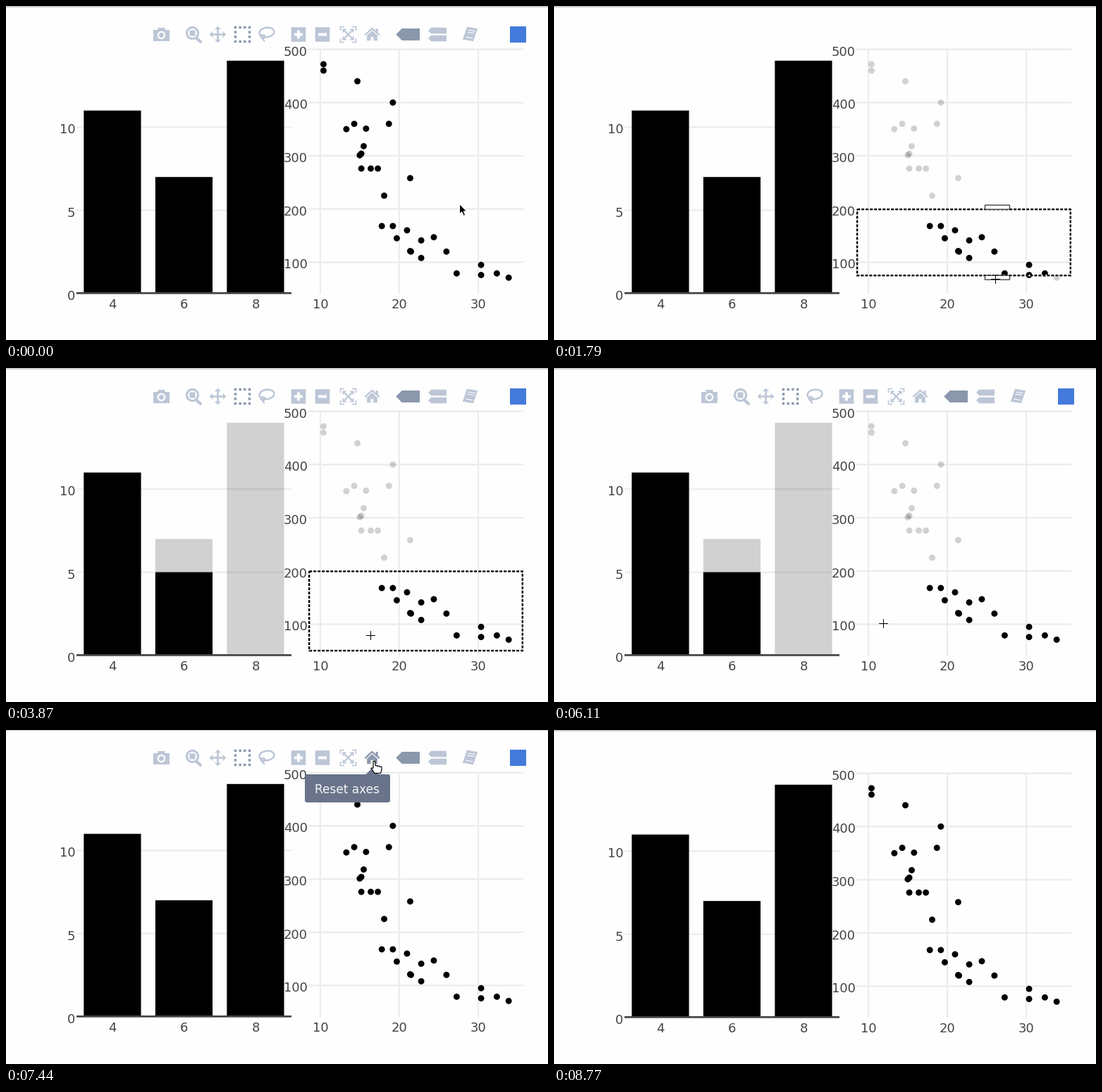
A matplotlib script for the animation above (9670 ms loop, 769 by 475 pixels).

```python
from itertools import product

import numpy as np
import matplotlib.pyplot as plt
from matplotlib.animation import FuncAnimation
from matplotlib.colors import to_rgb
from matplotlib.patches import Ellipse, FancyBboxPatch, Polygon, Rectangle

W, H, DPI = 769, 475, 64
PT = 72 / DPI                      # points per pixel
LOOP, STEPS, SUB = 9670, 65, 3
BG, INK, GRID = "#fefefe", "#444444", "#ececec"
ICON, ACTIVE, BLUE, TIP = "#bcc6d6", "#8b97ab", "#447adb", "#69738a"
FADE = 0.175

fig = plt.figure(figsize=(W / DPI, H / DPI), dpi=DPI, facecolor=BG)
ax = fig.add_axes([0, 0, 1, 1])
ax.axis("off")


def add(patch):
    patch.set_snap(False)
    return ax.add_patch(patch)


def rect(x0, y0, x1, y1, color, z=1, **kw):
    kw.setdefault("lw", 0)
    return add(Rectangle((x0, y0), x1 - x0, y1 - y0, fc=color, zorder=z, **kw))


def poly(pts, color, z=1, **kw):
    kw.setdefault("lw", 0)
    return add(Polygon(pts, closed=True, fc=color, zorder=z, **kw))


def line(pts, color, width, z=1, cap="butt"):
    xs, ys = zip(*pts)
    return ax.plot(xs, ys, color=color, lw=width * PT, zorder=z, snap=False,
                   solid_capstyle=cap, solid_joinstyle="miter")[0]


def label(x, y, s, size=18, color=INK, font="DejaVu Sans", z=3, ha="right"):
    return ax.text(x, y, s, fontsize=size * PT, color=color, family=font,
                   ha=ha, va="baseline", zorder=z)


# Page edge
rect(0, 0, W, 1, "#d0d0d0")
rect(0, 1, W, 2, "#c6c6c6")


# Bar chart
def bar_y(v):
    return 408.6 - 23.63 * v


for v in (0, 5, 10):
    y = bar_y(v)
    if v:
        rect(100, y - 1.1, 405, y + 1.1, GRID)
    label(98.3, y + 9.1, str(v))
rect(100, 407, 405, 409.7, INK, 3)

COUNTS, PICKED = (11, 7, 14), (11, 5, 0)
base_bars, top_bars = [], []
for i, n in enumerate(COUNTS):
    mid = 100.2 + 101.5 * (i + 0.5)
    label(mid, 430, str(4 + 2 * i), ha="center")
    for group, color in ((base_bars, (0, 0, 0, FADE)), (top_bars, "black")):
        group.append(rect(mid - 40.6, bar_y(n), mid + 40.6, bar_y(0), color, 2))


# Scatter plot
def dot_x(v):
    return 446 + 11.18 * (v - 10)


def dot_y(v):
    return 364.4 - 0.757 * (v - 100)


for v in (10, 20, 30):
    x = round(dot_x(v))
    rect(x - 1.1, 61, x + 1.1, 409, GRID)
    label(x, 430, str(v), ha="center")
for v in range(100, 501, 100):
    y = dot_y(v)
    rect(429, y - 1.2, 734, y + 1.2, GRID)
    label(428, y + 9, str(v))

# The charted data: fuel economy, engine size
CARS = np.array([
    (21, 160), (22.8, 108), (21.4, 258), (18.7, 360), (18.1, 225), (14.3, 360),
    (24.4, 147), (22.8, 141), (19.2, 168), (17.8, 168), (16.4, 276), (17.3, 276),
    (15.2, 276), (10.4, 472), (10.4, 460), (14.7, 440), (32.4, 79), (30.4, 76),
    (33.9, 71), (21.5, 120), (15.5, 318), (15.2, 304), (13.3, 350), (19.2, 400),
    (27.3, 79), (26, 120), (30.4, 95), (15.8, 351), (19.7, 145), (15, 301),
    (21.4, 121)])
px, py = dot_x(CARS[:, 0]), dot_y(CARS[:, 1])
dots = ax.scatter(px, py, s=(8.9 * PT) ** 2, c="black", linewidths=0, zorder=4)

# Selection outline and its drag handles
LEFT, RIGHT, TOP = 430.2, 732.8, 289.2
dash = (0, (4 / 2.4, 2 / 2.4))
outline = [rect(LEFT, TOP, RIGHT, TOP, "none", 5, ec=c, lw=2.4 * PT, ls=s)
           for c, s in (("white", "-"), ("black", dash))]
grips = [rect(611.5, y, 646.5, y + 6, "white", 6, ec=INK, lw=1.4 * PT)
         for y in (TOP - 6, TOP)]

# Hover label
hover = [
    rect(457, 363, 538, 397, BG, 6),
    rect(538, 366, 626, 394, "black", 7),
    poly([(625.5, 372), (634, 380), (625.5, 388)], "black", 7),
    label(532, 387, "selected", 19, "black", "Liberation Sans", 8),
    label(582, 387, "(27.3, 79)", 19, "white", "Liberation Sans", 8, "center"),
]

# Button tooltip
tooltip = [
    add(FancyBboxPatch((427, 67), 115, 34, fc=TIP, lw=0, zorder=8,
                       boxstyle="round,pad=3,rounding_size=3")),
    poly([(510, 64.5), (519.5, 55.5), (529, 64.5)], TIP, 8),
    label(484.5, 91, "Reset axes", 17, "#f4f4f6", z=9, ha="center"),
]

# Toolbar: every part keeps its full colour so it can be faded to the page
MID = 40.5
parts = []


def part(artist, color):
    parts.append((artist, np.array(to_rgb(color))))
    return artist


def fill(pts, color=ICON):
    return part(poly(pts, color), color)


def box(x, y, w, h, color=ICON):
    return part(rect(x - w / 2, y - h / 2, x + w / 2, y + h / 2, color), color)


def stroke(pts, width, color=ICON, cap="butt"):
    return part(line(pts, color, width, cap=cap), color)


def disc(x, y, r, color=ICON):
    part(add(Ellipse((x, y), 2 * r, 2 * r, fc=color, lw=0)), color)


def ring(x, y, w, h, width, angle=0):
    part(add(Ellipse((x, y), w, h, angle=angle, fill=False, ec=ICON,
                     lw=width * PT)), ICON)


def camera(x):
    box(x, MID + 1.5, 23, 16)
    box(x, MID - 7.5, 10, 4)
    disc(x, MID + 1, 5.8, BG)
    disc(x, MID + 1, 3.5)


def magnifier(x):
    stroke([(x + 4, MID + 5), (x + 10, MID + 10.5)], 4.2, cap="round")
    disc(x - 1.5, MID - 2, 9.6)
    disc(x - 1.5, MID - 2, 6.6, BG)
    box(x - 1.5, MID - 2, 8, 8)


def arrows(x, dirs, reach, head, width):
    for d in np.array(dirs):
        c, side = np.array((x, MID)), np.array((-d[1], d[0]))
        neck = c + d * (reach - head)
        stroke([c, neck], width)
        fill([c + d * reach, neck + side * head, neck - side * head])


def dotted_square(x):
    offsets = 6.7 * (np.arange(4) - 1.5)
    for dx, dy in product(offsets, offsets):
        if max(abs(dx), abs(dy)) > 6.7:
            box(x + dx, MID + dy, 3.4, 3.4, ACTIVE)


def lasso(x):
    ring(x, MID - 3, 21, 13.5, 2.4, -8)
    ring(x - 5.5, MID + 3, 6, 5, 2)
    stroke([(x - 7, MID + 5), (x - 3, MID + 10)], 2)


def zoom_button(x, plus):
    box(x, MID, 20.6, 20.6)
    box(x, MID, 12, 4, BG)
    if plus:
        box(x, MID, 4, 12, BG)


def autoscale(x):
    diagonals = list(product((-1, 1), repeat=2))
    for sx, sy in diagonals:
        stroke([(x + a * sx, MID + b * sy)
                for a, b in ((5.5, 11), (11, 11), (11, 5.5))], 1.6)
    arrows(x, diagonals, 8, 3, 2.2)


def house(x):
    return [stroke([(x - 10.3, 41.3), (x, 32), (x + 10.3, 41.3)], 2.3),
            box(x + 6.7, 35, 3, 6),
            fill([(x - 7.3, 41.8), (x, 35.2), (x + 7.3, 41.8)]),
            box(x - 4.65, 45.4, 5.3, 7.8),
            box(x + 4.65, 45.4, 5.3, 7.8),
            box(x, 42.8, 4, 2.6)]


def tag(x, y, w, h, color=ICON):
    tip = x + h / 2
    fill([(x, y), (tip, y - h / 2), (x + w, y - h / 2), (x + w, y + h / 2),
          (tip, y + h / 2)], color)


def book(x):
    def slanted(u, v):
        return x + u - 0.35 * v, MID - 0.5 + v + 0.17 * u
    fill([slanted(u, v) for u, v in ((-8, -9), (7, -9), (7, 9), (-8, 9))])
    for v in (-5, -2, 5):
        stroke([slanted(-5, v), slanted(5, v)], 1.1, BG)


camera(220.5)
magnifier(266)
arrows(300.5, [(1, 0), (-1, 0), (0, 1), (0, -1)], 11.8, 4.6, 2.6)
dotted_square(335.5)
lasso(370)
zoom_button(415, True)
zoom_button(449, False)
autoscale(485.5)
home = house(519.5)
tag(553.3, MID, 33.7, 17, ACTIVE)
for dy in (-5.5, 5.5):
    tag(599, MID + dy, 26, 8.6)
book(659)
box(726.5, MID, 23, 23, BLUE)

# Pointers, relative to their hot spot
ARROW = np.array([(0, 0), (0, 14.5), (3.3, 11.4), (5.8, 17), (8.3, 16),
                  (5.9, 10.5), (10.3, 10.5)])
fingers = [(3 * i + dx, 5.5 + 0.7 * i if i else 0)
           for i in range(4) for dx in (-1.5, 1.3)]
HAND = np.array(fingers + [(10.6, 11.5), (9, 17), (0.5, 17), (-4.8, 9.6),
                           (-1.5, 9.8)])
CROSS = np.array([(-6.5, 0), (6.5, 0), (np.nan, np.nan), (0, -6.5), (0, 6.5)])
arrow = poly(ARROW, "black", 11, ec="white", lw=1.1 * PT)
hand = poly(HAND, "white", 11, ec="black", lw=1.2 * PT)
cross = line(CROSS, "black", 1, 11)

# Pointer moves: first step, last step, destination
START = (643, 281)
MOVES = [(3, 6, (627, 289)), (8, 15, (626, 403)), (21, 26, (517, 380)),
         (35, 39, (467, 363)), (42, 47, (522, 44)), (53, 57, (746, 451))]


def ramp(k, a, b):
    return np.clip((k - a) / (b - a), 0, 1)


def pointer(k):
    pos = np.array(START, float)
    for a, b, goal in MOVES:
        pos += (goal - pos) * (1 - (1 - ramp(k, a, b)) ** 2.4)
    return pos


def toolbar_level(k):
    return 1 - ramp(k, 8, 11) + ramp(k, 16, 18) ** 1.7 - ramp(k, 56, 59)


def show(artists, on):
    for a in artists:
        a.set_visible(on)


def draw_toolbar(level, on_home):
    back = np.array(to_rgb(BG))
    for artist, rgb in parts:
        if on_home and artist in home:
            rgb = np.array(to_rgb(ACTIVE))
        artist.set_visible(level > 0)
        artist.set_color(tuple(back + (rgb - back) * level))
    show(tooltip, on_home)


def draw_selection(k):
    # the box trails slightly behind the pointer
    bottom = pointer(min(k, 16) - 0.3)[1] - 1
    picked = (py > TOP) & (py < bottom) if 9 <= k < 50 else py > 0
    rgba = np.zeros((py.size, 4))
    rgba[:, 3] = np.where(picked, 1, FADE)
    dots.set_facecolors(rgba)
    for r in outline:
        r.set_height(bottom - TOP)
    grips[1].set_y(bottom)
    show(outline, 9 <= k < 41)
    show(grips, 9 <= k < 16)
    show(hover, 16 <= k < 22)


def draw_bars(linked):
    show(base_bars, linked)
    for bar, n in zip(top_bars, PICKED if linked else COUNTS):
        bar.set_y(bar_y(n))
        bar.set_height(bar_y(0) - bar_y(n))


def draw_pointer(k, on_home, lift):
    x, y = np.round(pointer(k)) + 0.5
    pos = np.array((x, y + lift))
    arrow.set_xy(ARROW + pos)
    hand.set_xy(HAND + pos)
    cross.set_data(*(CROSS + pos).T)
    is_arrow = k < 4 or x > RIGHT
    show([arrow], is_arrow and k < 58)
    show([hand], on_home)
    show([cross], not is_arrow and not on_home)


def draw(i):
    k = min((i + 1) // SUB, STEPS - 1)
    on_home = 46 <= k <= 53
    lift = int(on_home)            # the page scrolls one pixel with the tooltip
    ax.set_xlim(0, W)
    ax.set_ylim(H + lift, lift)
    draw_toolbar(toolbar_level(k), on_home)
    draw_selection(k)
    draw_bars(16 <= k < 50)
    draw_pointer(k, on_home, lift)
    return []


anim = FuncAnimation(fig, draw, frames=STEPS * SUB, init_func=lambda: draw(0),
                     interval=LOOP / (STEPS * SUB), repeat=True, repeat_delay=0)
plt.show()
```
